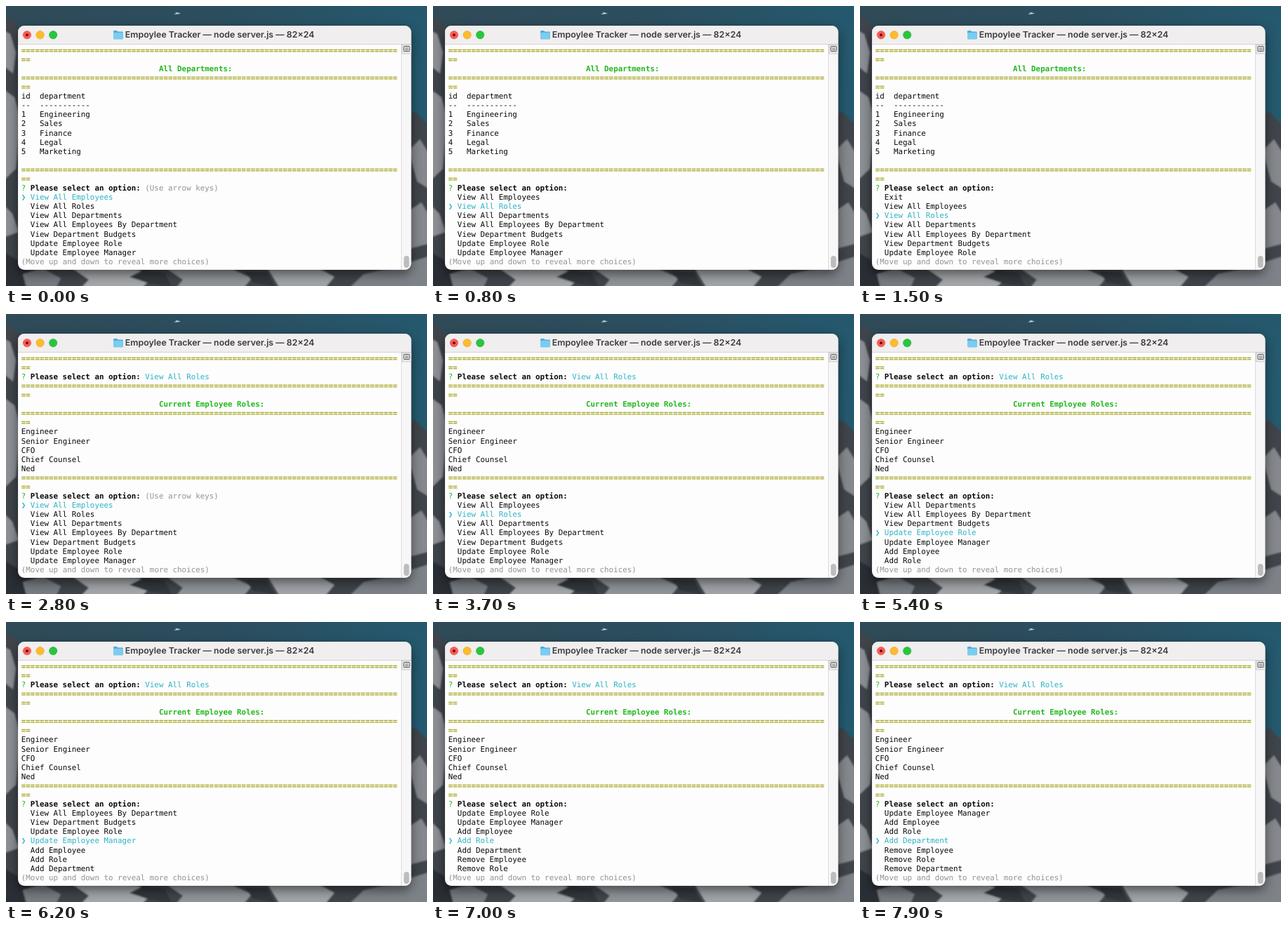
Write an HTML page that moves like this. It is 600 by 399 pixels and loops after 8000 ms.

```html
<!DOCTYPE html>
<html lang="en">
<head>
<meta charset="utf-8">
<title>Terminal menu</title>
<style>
  html, body { margin: 0; width: 100%; height: 100%; overflow: hidden; background: #2c4a58; }
  svg { display: block; width: 600px; height: 399px; }
  text { text-rendering: geometricPrecision; white-space: pre; }
  .title { font: 600 12.4px Inter, "Open Sans", sans-serif; fill: #3c3b3d; text-anchor: middle; }
  #screen { font: 10.86px "DejaVu Sans Mono", "Liberation Mono", monospace; fill: #0a0a0a; }
  .bold, .rule, .head { font-weight: 700; }
  .rule { fill: #a0a116; }
  .head, .mark { fill: #22b81e; }
  .pick { fill: #2db4c3; }
  .dim { fill: #939393; }
</style>
</head>
<body>
<svg viewBox="0 0 600 399">
  <defs>
    <linearGradient id="sky" x2="1" y2=".25">
      <stop offset="0" stop-color="#304a57"/>
      <stop offset=".5" stop-color="#2b4e5f"/>
      <stop offset="1" stop-color="#245a70"/>
    </linearGradient>
    <filter id="soft" x="-10%" y="-10%" width="120%" height="120%"><feGaussianBlur stdDeviation="1.2"/></filter>
    <filter id="shade" x="-10%" y="-10%" width="120%" height="125%"><feGaussianBlur stdDeviation="8"/></filter>
    <clipPath id="frame"><rect x="17" y="28" width="560.5" height="348" rx="9"/></clipPath>
  </defs>

  <!-- mountain backdrop -->
  <rect width="600" height="399" fill="url(#sky)"/>
  <g filter="url(#soft)">
    <path d="M-5 14L8 18 20 32 120 120 420 250 565 170 582 150 605 172V405H-5Z" fill="#41454b"/>
    <path d="M-5 34L6 40 14 66 10 96-5 84ZM-5 118L12 130 20 160 14 232-5 250ZM-5 282L9 296 18 322-5 330Z" fill="#8d9195"/>
    <path d="M-5 350L16 362 28 376 58 380 46 405H-5Z" fill="#2b2e34"/>
    <path d="M24 382L52 374 78 388 70 405H30Z" fill="#777c82"/>
    <path d="M92 372H176L212 384 190 405H104L118 390Z" fill="#a4a7aa"/>
    <path d="M226 372H316L350 388 336 405H240L252 390Z" fill="#8f9499"/>
    <path d="M372 372H442L468 386 452 405H392Z" fill="#a0a4a8"/>
    <path d="M486 405L510 382 548 374 605 356V405Z" fill="#7d8288"/>
    <path d="M574 206L590 190 605 214V262L586 250ZM574 292L592 280 605 302V338L574 346Z" fill="#85888c"/>
    <path d="M176 386L196 376 226 380 236 400 206 396ZM340 378L372 380 384 400 352 394Z" fill="#33373d"/>
  </g>
  <path d="M239 12L243 10 241 8.5 245 9.6 249 10.5 245 11.5Z" fill="#c3d0d6"/>

  <!-- window -->
  <rect x="17" y="34" width="560" height="348" rx="10" fill="#000" opacity=".5" filter="url(#shade)"/>
  <g clip-path="url(#frame)">
    <rect x="17" y="28" width="561" height="348" fill="#fefdfe"/>
    <rect x="17" y="28" width="561" height="26.5" fill="#f0eeef"/>
    <path d="M17 54.5H578" stroke="#d5d3d4"/>
    <rect x="563.5" y="55" width="14" height="321" fill="#f8f7f8"/>
    <path d="M563.5 55V376" stroke="#dddcdd"/>
  </g>
  <rect x="17" y="28" width="560.5" height="348" rx="9" fill="none" stroke="#000" stroke-opacity=".18" stroke-width=".6"/>
  <g stroke-width=".5">
    <circle cx="30" cy="41.2" r="5.7" fill="#fd5b54" stroke="#dc4840"/>
    <circle cx="48.6" cy="41.2" r="5.7" fill="#fdbb2d" stroke="#dca024"/>
    <circle cx="67.2" cy="41.2" r="5.7" fill="#29c53f" stroke="#20a934"/>
  </g>
  <circle cx="30" cy="41.2" r="2" fill="#6e0b08"/>
  <path d="M153 36.3q0-1.3 1.3-1.3h3.7l1.5 1.5h6q1.3 0 1.3 1.3V46q0 1.2-1.2 1.2h-11.4q-1.2 0-1.2-1.2Z" fill="#51afd9"/>
  <rect x="153" y="38" width="13.8" height="9.2" rx="1.1" fill="#7accf0"/>
  <text class="title" x="304.7" y="45.3">Empoylee Tracker — node server.js — 82×24</text>
  <rect x="564.5" y="55" width="13" height="13" fill="#e9e8e9" stroke="#b9b8b9" stroke-width=".6"/>
  <rect x="567" y="57.5" width="8" height="7" rx=".8" fill="#fff" stroke="#4a4a4a"/>
  <path d="M568.5 60H573.5M568.5 62.3H573.5" stroke="#4a4a4a"/>
  <rect x="567" y="356" width="7.6" height="17" rx="3.8" fill="#bebdbe"/>
  <g id="screen"></g>
</svg>

<script>
const LOOP = 8000, LEFT = 21.8, BASE = 66.7, PITCH = 13.09, CELL = 6.537, PAGE = 7;

const choices = [
  "View All Employees", "View All Roles", "View All Departments",
  "View All Employees By Department", "View Department Budgets",
  "Update Employee Role", "Update Employee Manager",
  "Add Employee", "Add Role", "Add Department",
  "Remove Employee", "Remove Role", "Remove Department", "Exit"
];

// time in ms, key pressed
const keys = [
  [500, "down"], [900, "down"], [1300, "up"], [2200, "enter"],
  [3400, "down"], [3900, "down"], [4300, "down"], [4800, "down"],
  [5200, "down"], [5900, "down"], [6300, "down"], [6800, "down"], [7500, "down"]
];

// A line is a list of [column, text, class] parts.
const plain = text => [[0, text, ""]];
const rule = [[[0, "=".repeat(82), "rule"]], [[0, "==", "rule"]]];
const heading = text => [[30, text, "head"]];
const prompt = (text, style) => [[0, "?", "mark"], [2, "Please select an option:", "bold"], [27, text, style]];

const outputs = [
  [
    ...rule, heading("All Departments:"), ...rule,
    ...["id  department", "--  -----------", "1   Engineering", "2   Sales",
        "3   Finance", "4   Legal", "5   Marketing", ""].map(plain),
    ...rule
  ],
  [
    ...rule, prompt("View All Roles", "pick"), ...rule,
    heading("Current Employee Roles:"), ...rule,
    ...["Engineer", "Senior Engineer", "CFO", "Chief Counsel", "Ned"].map(plain),
    ...rule
  ]
];

// Replays the keys; the pointer sinks to the middle row, then the list scrolls.
function stateAt(time) {
  const s = { output: 0, active: 0, row: 0, fresh: true };
  for (const [at, key] of keys) {
    if (at > time) break;
    if (key === "enter") {
      Object.assign(s, { output: 1, active: 0, row: 0, fresh: true });
      continue;
    }
    const step = key === "down" ? 1 : -1;
    s.active = (s.active + step + choices.length) % choices.length;
    if (step > 0) s.row = Math.min(3, s.row + 1);
    s.fresh = false;
  }
  return s;
}

function linesFor(s) {
  const menu = Array.from({ length: PAGE }, (_, i) => {
    const n = (s.active - s.row + i + choices.length) % choices.length;
    return i === s.row
      ? [[0, "❯", "pick"], [2, choices[n], "pick"]]
      : [[2, choices[n], ""]];
  });
  return [
    ...outputs[s.output],
    prompt(s.fresh ? "(Use arrow keys)" : "", "dim"),
    ...menu,
    [[0, "(Move up and down to reveal more choices)", "dim"]]
  ];
}

const screen = document.getElementById("screen");

function draw(lines) {
  const parts = lines.flatMap((line, row) => line.map(([col, text, style]) => {
    const el = document.createElementNS(screen.namespaceURI, "text");
    el.setAttribute("x", LEFT + col * CELL);
    el.setAttribute("y", BASE + row * PITCH);
    el.setAttribute("class", style);
    el.textContent = text;
    return el;
  }));
  screen.replaceChildren(...parts);
}

let shown = "";
function tick() {
  const s = stateAt(performance.now() % LOOP);
  const id = JSON.stringify(s);
  if (id !== shown) {
    draw(linesFor(s));
    shown = id;
  }
  requestAnimationFrame(tick);
}
tick();
</script>
</body>
</html>
```
